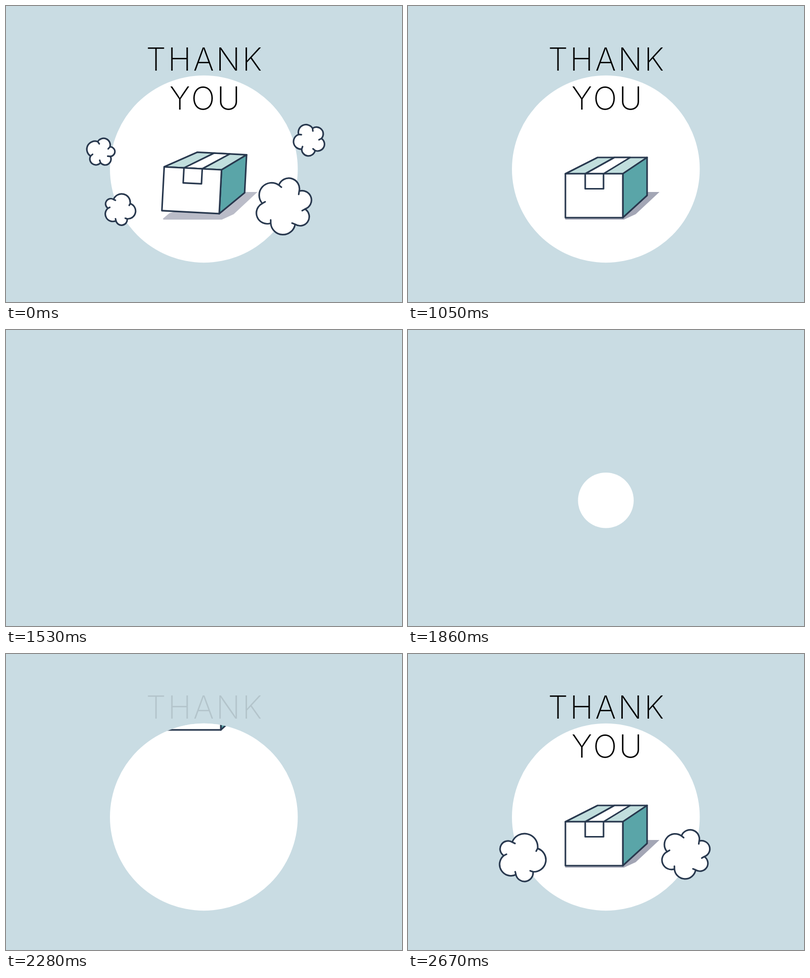
An HTML page that plays this animation: 800x600 px, repeating every 2700 ms.

```html
<!DOCTYPE html>
<html lang="en">
<head>
<meta charset="utf-8">
<title>Thank you</title>
<style>
  html, body { margin: 0; width: 100%; height: 100%; overflow: hidden; background: #c9dce3; }
  svg { display: block; width: 100vw; height: 100vh; }
  text { font: 250 64px Inter, sans-serif; letter-spacing: 4px; text-anchor: middle; }
  .ink { stroke: #28384e; stroke-width: 3.2; stroke-linejoin: round; stroke-linecap: round; }
  .cloud path { fill: #fff; vector-effect: non-scaling-stroke; }
</style>
</head>
<body>
<svg viewBox="0 0 800 600">
  <clipPath id="hole"><circle cx="399.7" cy="330.5" r="189.7"/></clipPath>
  <g id="scene">
    <circle id="disc" cx="399.7" fill="#fff"/>
    <g clip-path="url(#hole)">
      <path id="shadow" fill="#a3a6b5" d="M317 431L330 420L482 377H508L460 422L436 433H318Z"/>
      <g id="box" class="ink">
        <path fill="#c1dedd" d="M318 340L383 307H483L434 340Z"/>
        <path fill="#fff" d="M358 340L417 307H449L395 340Z"/>
        <path fill="#5aa5a8" d="M434 340L483 307V384L434 429Z"/>
        <path fill="#fff" d="M318 340H434V429H318Z"/>
        <path fill="#fff" d="M358 340H395V370.5H358Z"/>
      </g>
    </g>
    <text id="thank" x="402" y="130.5">THANK</text>
    <text id="you" x="403.5" y="209.5">YOU</text>
    <g id="clouds"></g>
  </g>
</svg>
<script>
const LOOP = 2700, STEP = 30, SETTLED = 3300;
const $ = id => document.getElementById(id);
const clamp = v => Math.max(0, Math.min(1, v));
const progress = (t, from, to) => clamp((t - from) / (to - from));
const easeOut = p => 1 - (1 - p) ** 2;
const easeOutBack = p => 1 + 2.5 * (p - 1) ** 3 + 1.5 * (p - 1) ** 2;

// Parabola from 0 to 1 and back between two times.
function arc(t, from, to) {
  const p = progress(t, from, to);
  return 4 * p * (1 - p);
}

// Valleys are angles in degrees; life is start, peak and end of a puff.
const clouds = [
  { x: 230, y: 412.5, r: 49, valleys: [238, 330, 412, 469, 546], life: [2590, 2670, 2757] },
  { x: 561, y: 405.5, r: 58, valleys: [257, 316, 368, 418, 487, 547], life: [2617, 2700, 2940] },
  { x: 191, y: 296, r: 29, valleys: [255, 331, 384, 450, 518], life: [2670, 2700, 3000] },
  { x: 613, y: 271.5, r: 32.5, valleys: [207, 285, 353, 422, 490], life: [2670, 2700, 3030] }
];

// Arcs between valleys, each touching the outer radius halfway.
function cloudPath({ r, valleys }) {
  const inner = r * .75;
  const at = (deg, radius) =>
    `${radius * Math.cos(deg * Math.PI / 180)} ${radius * Math.sin(deg * Math.PI / 180)}`;
  let outline = "M" + at(valleys[0], inner), hooks = "";
  valleys.forEach((deg, i) => {
    const next = valleys[i + 1] || valleys[0] + 360;
    const half = (next - deg) * Math.PI / 360;
    const reach = inner * Math.sin(half), sag = r - inner * Math.cos(half);
    const bend = (reach * reach + sag * sag) / (2 * sag);
    outline += `A${bend} ${bend} 0 ${sag > reach ? 1 : 0} 1 ${at(next, inner)}`;
    hooks += `M${at(deg, inner)}L${at(deg + 6, inner - 5)}`;
  });
  return outline + "Z" + hooks;
}

for (const c of clouds) {
  c.node = document.createElementNS("http://www.w3.org/2000/svg", "g");
  c.node.setAttribute("class", "cloud ink");
  c.node.innerHTML = `<path d="${cloudPath(c)}"/>`;
  $("clouds").append(c.node);
}

function draw(time) {
  const now = time < 600 ? time + LOOP : time;
  const leaving = now <= 1530;
  const t = leaving ? SETTLED : now;
  $("scene").setAttribute("opacity", leaving ? 1 - progress(now, 1050, 1530) : 1);

  const pop = progress(t, 1840, 2115);
  $("disc").setAttribute("r", 189.7 * Math.max(0, easeOutBack(pop)));
  $("disc").setAttribute("cy", 330.5 + 16 * (1 - pop));
  $("thank").setAttribute("opacity", progress(t, 2255, 2505));
  $("you").setAttribute("opacity", progress(t, 2290, 2540));

  const fall = progress(t, 2195, 2490);
  const bounce = arc(t, 2490, 2670), hop = arc(t, 2670, 2790);
  const lift = 300 * (1 - fall * fall) + 22 * bounce + 13 * hop;
  $("box").setAttribute("transform",
    `translate(0 ${-lift}) rotate(${4 * hop - 3 * bounce} 400 368)`);
  $("shadow").setAttribute("opacity", clamp(1 - lift / 38));

  for (const c of clouds) {
    const [start, peak, end] = c.life;
    const size = easeOut(progress(t, start, peak)) * (1 - progress(t, peak, end));
    c.node.style.display = size > .01 ? "" : "none";
    c.node.setAttribute("transform", `translate(${c.x} ${c.y}) scale(${size})`);
  }
}

const start = performance.now();
function tick() {
  const time = (performance.now() - start) % LOOP;
  draw(Math.floor(time / STEP) * STEP);
  requestAnimationFrame(tick);
}
tick();
</script>
</body>
</html>
```
